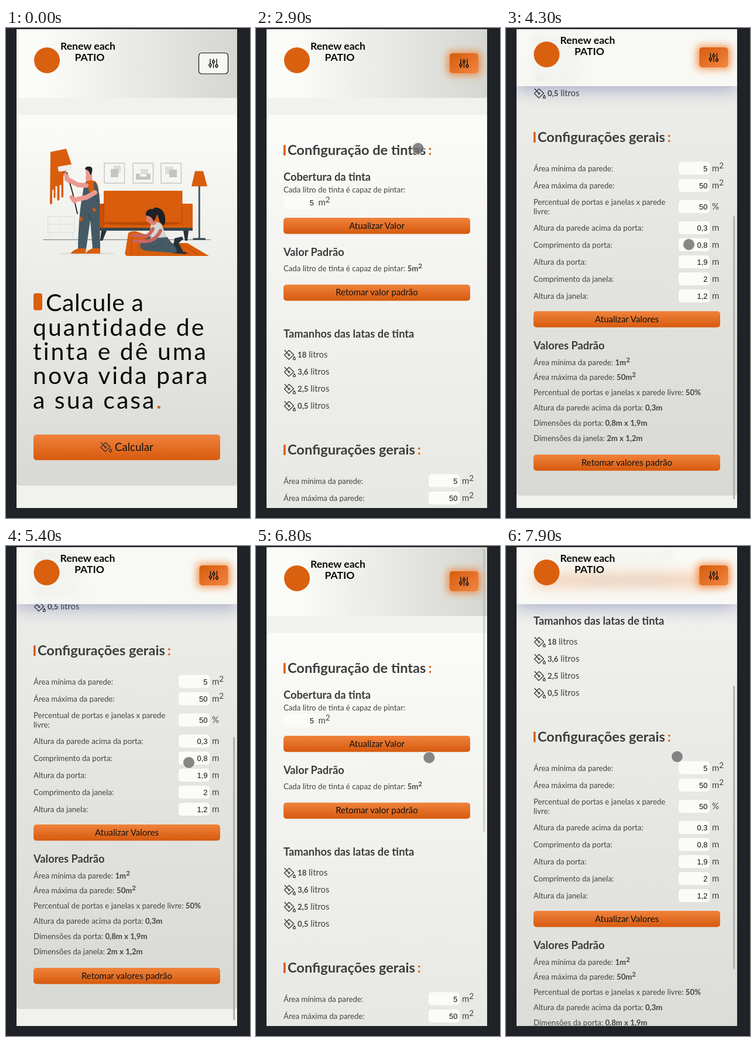
These frames come from a looping animation (417 by 834 pixels, 8000 ms). An HTML page:

```html
<!DOCTYPE html>
<html lang="pt">
<head>
<meta charset="utf-8">
<title>Calculadora de tinta</title>
<style>
html, body { margin: 0; width: 100%; height: 100%; overflow: hidden; background: #1f2226; }
#screen { position: absolute; left: 18px; top: 2px; width: 377px; height: 815px; overflow: hidden; background: #f1f2ed; }
svg { position: absolute; left: 0; top: 0; }
#bar, #glass { position: absolute; left: 0; top: 0; width: 100%; }
#bar { background: linear-gradient(90deg, #fbfbf8 12%, #eeefeb 42%, #d5d6d1); }
#glass { background: rgba(251, 251, 247, .74); backdrop-filter: blur(10px); box-shadow: 0 6px 28px rgba(31, 38, 135, .34); }
text { font: 13.2px Lato, sans-serif; fill: #444; }
.h1 { font-size: 41px; letter-spacing: 3px; fill: #090909; }
.first { letter-spacing: .6px; }
.h2 { font-size: 23.6px; font-weight: 700; fill: #3c3c3c; }
.h3 { font-size: 18.3px; font-weight: 700; fill: #3c3c3c; }
.btn { font-size: 15px; fill: #111; text-anchor: middle; }
.unit { font-size: 15px; }
.val { font: 13px "Liberation Sans", Arial, sans-serif; fill: #111; text-anchor: end; }
.logo { font-size: 17.6px; font-weight: 700; fill: #0b0b0b; text-anchor: middle; }
.b { font-weight: 700; }
.o { fill: #d9600f; }
</style>
</head>
<body>
<div id="screen">
  <svg id="page" width="377" height="815" viewBox="18 2 377 815">
    <defs>
      <linearGradient id="card" x2="0" y2="1"><stop stop-color="#fbfbf8"/><stop offset="1" stop-color="#d8d9d4"/></linearGradient>
      <linearGradient id="orange" x2="0" y2="1"><stop stop-color="#f0833c"/><stop offset="1" stop-color="#d65a0e"/></linearGradient>
      <linearGradient id="menuFill" x2="1" y2="1"><stop stop-color="#d65c0e"/><stop offset="1" stop-color="#f28540"/></linearGradient>
      <filter id="glow" x="-60%" y="-80%" width="220%" height="260%"><feGaussianBlur stdDeviation="6.5"/></filter>
      <g id="can" fill="none" stroke="#333" stroke-width="1.25" stroke-linejoin="round" stroke-linecap="round">
        <path d="M1.5 9.500 9.500 1.500 17.500 9 9 17Z M2 1.500 8.500 8.500"/>
        <circle cx="9.5" cy="9.5" r="1.3"/>
        <path d="M18.400 12.500q-4 5.200 0 5.200t0-5.200"/>
      </g>
    </defs>
    <g id="home"></g>
    <g id="config"></g>
  </svg>
  <div id="bar"></div>
  <div id="glass"></div>
  <svg width="377" height="815" viewBox="18 2 377 815">
    <g id="brand">
      <circle cx="70" cy="55" r="22" class="o"/>
      <text class="logo" x="140" y="37">Renew each</text>
      <text class="logo" x="143" y="56">PATIO</text>
      <g id="menuOff"><rect x="329.5" y="42.5" width="50" height="35.5" rx="5" fill="#f7f7f4" stroke="#111" stroke-width="1.2"/></g>
      <g id="menuOn">
        <rect x="327" y="40" width="57" height="40" rx="6" fill="#f07018" opacity=".72" filter="url(#glow)"/>
        <rect x="331" y="43" width="49" height="34" rx="5" fill="url(#menuFill)"/>
      </g>
      <g id="sliders" fill="none" stroke="#111" stroke-width="1.4" stroke-linecap="round">
        <path d="M349 53v8m0 4v2.500M354.500 53v2.500m0 4v8M360 53v9.500m0 4v1"/>
        <circle cx="349" cy="63" r="2"/><circle cx="354.5" cy="57.5" r="2"/><circle cx="360" cy="64.5" r="2"/>
      </g>
    </g>
    <rect id="thumb" x="388.3" width="2.8" height="482" rx="1.4" fill="#adadaa"/>
    <circle id="dot" r="10" fill="#6c6c6c" fill-opacity=".82" stroke="#fff" stroke-opacity=".6" stroke-width="1.3"/>
  </svg>
</div>
<script>
const $ = id => document.getElementById(id);

const text = (x, y, s, cls = '') => `<text x="${x}" y="${y}" class="${cls}">${s}</text>`;
const rect = (x, y, w, h, fill, r = 0) => `<rect x="${x}" y="${y}" width="${w}" height="${h}" rx="${r}" fill="${fill}"/>`;
const path = (d, fill) => `<path d="${d}" fill="${fill}"/>`;
const line = (d, color, w) => `<path d="${d}" fill="none" stroke="${color}" stroke-width="${w}" stroke-linecap="round" stroke-linejoin="round"/>`;
const oval = (x, y, rx, ry, fill) => `<ellipse cx="${x}" cy="${y}" rx="${rx}" ry="${ry}" fill="${fill}"/>`;
const bold = s => `<tspan class="b">${s}</tspan>`;
const sup = (s, size) => `<tspan dy="-5" style="font-size:${size}px">${s}</tspan>`;
const card = h => rect(18, 148, 377, h, 'url(#card)', 5);
const button = (y, label) => rect(47, y, 319, 27.5, 'url(#orange)', 5) + text(206.5, y + 18.5, label, 'btn');
const title = (y, s) => rect(47, y - 17, 3.6, 18, '#d9600f', 1) +
  text(54, y, `${s}<tspan class="o" dx="4">:</tspan>`, 'h2');
const unit = (x, y, u) => text(x, y, u === 'm2' ? 'm' + sup(2, 13.5) : u, 'unit');
const field = (x, y, w, value, u) => rect(x, y - 11, w, 22, '#fbfbf8', 5) +
  text(x + w - 3.5, y + 5, value, 'val') + unit(x + w + 4, y + 5, u);

const O = '#d95d0c', SLATE = '#455a64', DARK = '#263238', SKIN = '#eb9a90';

function picture(x, inner) {
  return `<rect x="${x}" y="230" width="34.5" height="34" fill="#f5f5f2" stroke="#c9cac6" stroke-width="1.6"/>` + inner;
}

function illustration() {
  const wall = path('M76 211 103 205.500 112 232 101 246 98 252V287q-2 4-3.500 0V268q-2-2-3 0v24q-2 4-4 0v-22q-1.500-2-3 0v18q-2 3-3 0v-12q-1.500-2-2.500 0v22q-2 5-4 0Z', O);
  const cabinet = line('M72 321h45v27H72zM74 334h41M75 349v8M114 349v8M91 328h6M91 341h6', '#d9dad6', 1);
  const frames = picture(168, rect(184, 234, 12, 12, '#deded9') + rect(179, 240, 13, 14, '#c4c5c0')) +
    picture(217, rect(230, 240, 13, 9, '#deded9') + path('M222 248h7v5h11v-5h7v10h-25z', '#c4c5c0')) +
    picture(265, rect(272, 236, 14, 13, '#deded9') + rect(279, 241, 13, 13, '#c4c5c0'));
  const sofa = path('M163 345h9l-7 17h-4zM303 345h9l-2 17h-4z', DARK) +
    rect(167, 277, 134, 64, O, 2) + rect(158, 299, 9.5, 42, '#c94f05', 1) + rect(301, 299, 18, 42, O, 1) +
    line('M167 299v36M301 277v58M168 331h132', '#a94304', .8) + oval(233, 333, 66, 2.5, '#b84a06') +
    rect(158, 340, 161, 5, '#37474f');
  const lamp = path('M323 243.500h14l7 26h-27z', O) + rect(328.8, 269, 3, 89, SLATE) + rect(319.5, 357.5, 21.5, 3.2, '#37474f', 1);
  const rug = path('M236 366h74l37 22H240z', O) + line('M300 368l28 17M288 368l26 17', '#a94304', .9) +
    path('M209 349q5-4 13-3l23 8q5 17 0 34h-37q-6 0-4-8z', O) + line('M216 352q-3 16-1 35M227 356q-2 15 0 30', '#b84a06', .8);
  const woman = path('M250 309q4-5 10-3 11 4 12 18 1 8-2 12-7-3-9-11-1-9-8-11z', '#1d2024') +
    path('M288 358l13-3 2 4-8 7 8 15 6 1-1 3-24-2z', DARK) +
    path('M250 353q-20 9-21 17 0 7 9 9l50 4q6-2 2-9l-16-20z', SLATE) + line('M250 374l18-8', '#2f424b', .8) +
    path('M248 333q8-6 17 0l10 23-28 2q4-9-1-13z', '#d4d6d2') +
    line('M251 342q-5 10-11 12l-24-1M264 345q-8 17-25 18l-20 0', '#c9655e', 6) +
    path('M240 316q8-5 13 2 1 9-4 14-7 1-9-5z', '#d98077') +
    path('M239 319q-1-9 8-11 9 0 11 9-1 7-6 12-2-9-13-10z', '#1d2024') + line('M246 330q5 5 9 1', '#d98077', 5);
  const man = line('M104 246l10 35 8 35', DARK, 2) +
    path('M136 252h11l1 12h-11z', SKIN) + path('M136 240q7-3 10 0l1 12q-5 6-10 2z', SKIN) +
    path('M135 240q1-5 9-4 5 1 3 9l-2 6-4-8z', '#1d2024') +
    path('M136 262q9-5 17-1 6 7 5 20l-20 5z', O) +
    path('M134 264l5-2 3 17h9l-1-17 4 2q8 18 6 45l1 67h-13l-4-49-7 49h-14q1-56 7-88z', SLATE) +
    line('M141 318l4 9M149 282q7 8 8 14', '#34474f', .9) + path('M147 305l8 4-5 5zM126 320l6 5-5 5z', O) +
    line('M137 268l-14-1-19-10M152 280l-14 8-22 5', SKIN, 8) +
    line('M102 250l5 10M112 288l5 7', SKIN, 7) +
    path('M124 375h13l-1 9h-25q1-5 13-9zM148 375h13v9h-25q2-5 12-9z', O) +
    `<g transform="rotate(-9 101 239)">${rect(89, 234, 25, 9, '#efefeb', 2)}</g>` + line('M104 248l-7-3', '#666', 1);
  return wall + cabinet + frames + line('M64 360.300H349', '#455057', .8) + sofa + lamp +
    oval(137, 384, 50, 2.5, '#e1e1dc') + rug + woman + man;
}

function homePage() {
  const lines = ['quantidade de', 'tinta e dê uma', 'nova vida para', 'a sua casa<tspan class="o">.</tspan>'];
  return card(631) + illustration() + rect(47, 451.5, 15, 29, '#d9600f', 4) + text(68, 482, 'Calcule a', 'h1 first') +
    lines.map((s, i) => text(46, 523.5 + i * 41.4, s, 'h1')).join('') +
    rect(47, 692, 319, 43.5, 'url(#orange)', 5) + '<use href="#can" x="160.5" y="704"/>' +
    `<text x="186" y="720" style="font-size:18.6px;fill:#111">Calcular</text>`;
}

function configPage() {
  const cover = 'Cada litro de tinta é capaz de pintar:';
  const rows = [
    [771, 'Área mínima da parede:', '5', 'm2'], [800.5, 'Área máxima da parede:', '50', 'm2'],
    [836.5, '', '50', '%'], [872.5, 'Altura da parede acima da porta:', '0,3', 'm'],
    [901.5, 'Comprimento da porta:', '0,8', 'm'], [930.5, 'Altura da porta:', '1,9', 'm'],
    [959.5, 'Comprimento da janela:', '2', 'm'], [988.5, 'Altura da janela:', '1,2', 'm']];
  const defaults = [
    ['Área mínima da parede:', '1m' + sup(2, 11.5)], ['Área máxima da parede:', '50m' + sup(2, 11.5)],
    ['Percentual de portas e janelas x parede livre:', '50%'], ['Altura da parede acima da porta:', '0,3m'],
    ['Dimensões da porta:', '0,8m x 1,9m'], ['Dimensões da janela:', '2m x 1,2m']];
  return card(1180) + title(216, 'Configuração de tintas') +
    text(47, 260, 'Cobertura da tinta', 'h3') + text(47, 280, cover) + field(47, 297, 55.5, '5', 'm2') +
    button(323, 'Atualizar Valor') + text(47, 388, 'Valor Padrão', 'h3') +
    text(47, 414, `${cover} ${bold('5m' + sup(2, 11.5))}`) + button(436.8, 'Retomar valor padrão') +
    text(47, 527, 'Tamanhos das latas de tinta', 'h3') +
    ['18', '3,6', '2,5', '0,5'].map((n, i) => `<use href="#can" x="47" y="${547 + i * 29}"/>` +
      text(71, 561 + i * 29, `${bold(n)}<tspan style="font-size:14.8px"> litros</tspan>`)).join('') +
    title(726, 'Configurações gerais') +
    text(47, 832.5, 'Percentual de portas e janelas x parede') + text(47, 849, 'livre:') +
    rows.map(([y, label, value, u]) => text(47, y + 4.5, label) + field(295, y - .5, 53, value, u)).join('') +
    button(1014, 'Atualizar Valores') + text(47, 1079, 'Valores Padrão', 'h3') +
    defaults.map(([label, value], i) => text(47, 1105.5 + i * 25.8, `${label} ${bold(value)}`)).join('') +
    button(1258, 'Retomar valores padrão');
}

$('home').innerHTML = homePage();
$('config').innerHTML = configPage();

// Each key is [time, ...values]; values between keys are linear.
const scrollKeys = [[3400, 0], [3500, 25], [3600, 100], [3800, 297], [3900, 375], [4000, 440], [4100, 488], [4300, 532], [4500, 540],
  [5400, 540], [5500, 515], [5600, 440], [5800, 250], [6000, 105], [6100, 54], [6200, 20], [6400, 0],
  [6950, 0], [7000, 20], [7200, 270], [7300, 330], [7400, 358], [7500, 368], [7700, 368], [7900, 393]];
const shrinkKeys = [[3400, 0], [3700, 1], [6300, 1], [6600, 0], [6950, 0], [7200, .9], [7300, 1]];
const thumbKeys = [[3400, 0], [3500, 1], [4600, 1], [4900, 0], [5300, 0], [5400, 1], [6700, 1], [6900, 0], [7000, 1]];
const dotKeys = [[500, 207.5, 18.5], [800, 270, 735], [1000, 325, 520], [1200, 358, 245], [1300, 358, 245], [1800, 342, 67],
  [2000, 342, 67], [2900, 277, 205], [3000, 277, 205], [3400, 312.5, 368.5], [6300, 312.5, 368.5], [6900, 292.5, 358.5]];

function at(keys, t) {
  const i = keys.findIndex(k => k[0] > t);
  if (i === 0) return keys[0].slice(1);
  if (i < 0) return keys[keys.length - 1].slice(1);
  const a = keys[i - 1], b = keys[i], f = (t - a[0]) / (b[0] - a[0]);
  return a.slice(1).map((v, n) => v + (b[n + 1] - v) * f);
}

const show = (id, on) => { $(id).style.display = on ? '' : 'none'; };

function draw(time) {
  const t = Math.floor(time % 8000 / 100) * 100;
  const [scroll] = at(scrollKeys, t), [shrink] = at(shrinkKeys, t), [dotX, dotY] = at(dotKeys, t);
  const height = 116.5 - 20 * shrink + 'px';
  show('home', t < 2200);
  show('config', t >= 2200);
  show('menuOff', t < 2100);
  show('menuOn', t >= 2100);
  show('glass', shrink > 0);
  show('dot', t >= 400);
  $('config').setAttribute('transform', `translate(0 ${-scroll})`);
  $('bar').style.height = $('glass').style.height = height;
  $('bar').style.opacity = 1 - shrink;
  $('glass').style.opacity = shrink;
  $('brand').setAttribute('transform', `translate(${-shrink * .5} ${-10 * shrink})`);
  $('sliders').setAttribute('transform', `translate(${t < 2100 ? 0 : 1} 0)`);
  $('thumb').setAttribute('y', 5 + scroll * .5926);
  $('thumb').setAttribute('opacity', at(thumbKeys, t)[0]);
  $('dot').setAttribute('cx', dotX);
  $('dot').setAttribute('cy', dotY);
}

const start = performance.now();
function tick() {
  draw(performance.now() - start);
  requestAnimationFrame(tick);
}
tick();
</script>
</body>
</html>
```
